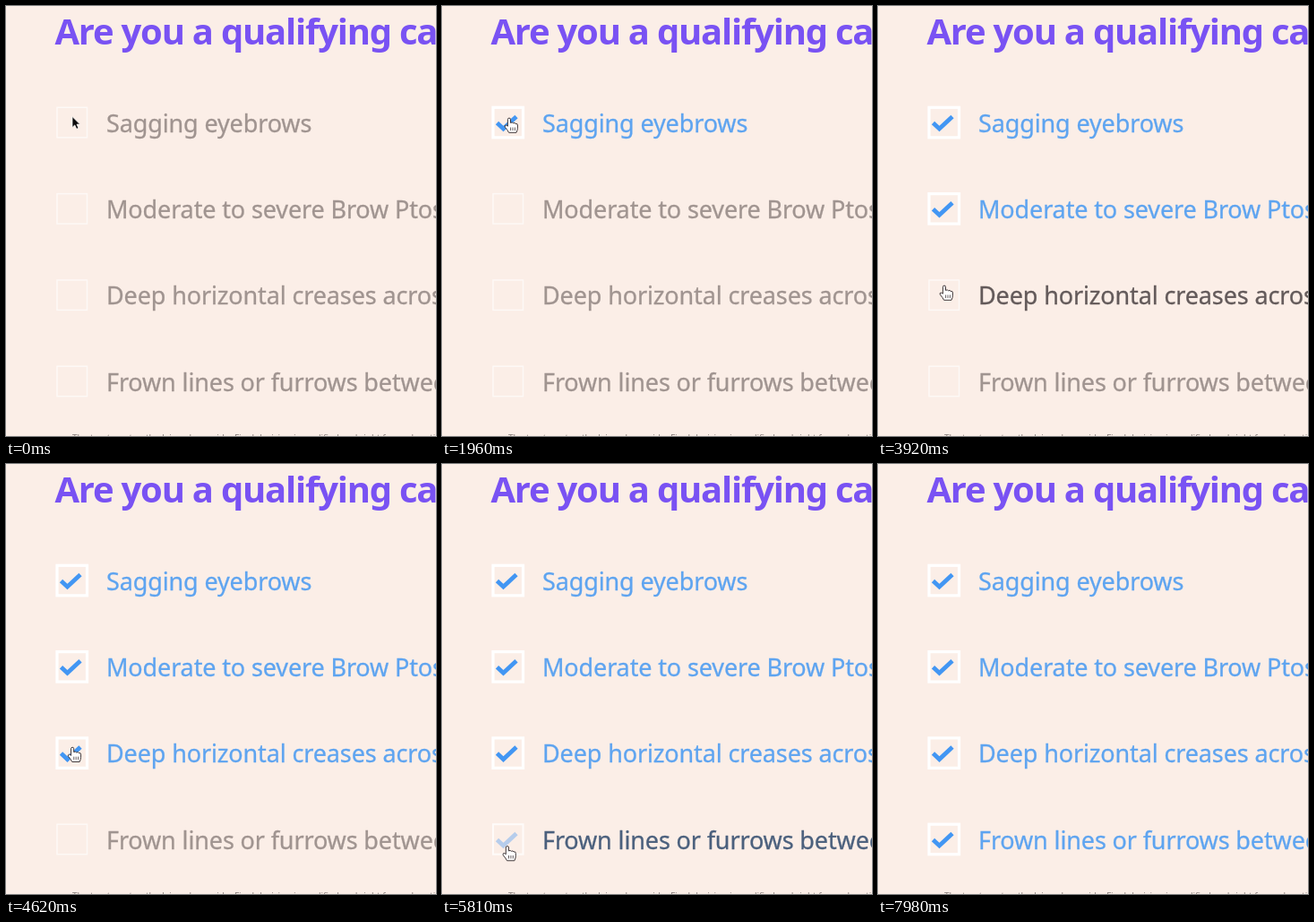
These frames come from a looping animation (480x480 px, 8 s). An HTML page:

```html
<!DOCTYPE html>
<html lang="en">
<head>
<meta charset="utf-8">
<title>Checklist</title>
<style>
  html, body { margin: 0; width: 100%; height: 100%; overflow: hidden; background: #fbeee7; }
  svg { display: block; width: 100vw; height: 100vh; }
  text { font-family: "Noto Sans", "Open Sans", sans-serif; white-space: pre; }
  .title { font-size: 40px; font-weight: 700; letter-spacing: -1.23px; fill: #7952f3; }
  .label { font-size: 27px; letter-spacing: -.13px; fill: currentColor; stroke: currentColor; stroke-width: .3; }
  .note { font-size: 10px; fill: #8f8582; }
  .box { fill: none; stroke: #fff; }
  .check { fill: none; stroke: #4296f3; stroke-width: 4.8; }
</style>
</head>
<body>
<svg viewBox="0 0 480 480">
  <rect width="480" height="480" fill="#fbeee7"/>
  <text class="title" x="54.5" y="43">Are you a qualifying candidate?</text>
  <g id="rows"></g>
  <text class="note" x="74" y="485.5">The treatment outlook is only a guide. Final decision is qualified and right for each patient</text>
  <g id="cursor">
    <path id="arrow" d="M0 0V12L2.8 9.4L4.8 13.8L6.9 12.8L5 8.6H8.6Z" fill="#0c0a0b" stroke="#fff" stroke-width=".7"/>
    <g id="hand" fill="#fff" stroke="#3f3739" stroke-width="1" stroke-linejoin="round">
      <path d="M-1.6 9.2V1.6Q-1.6 .1 0 .1T1.5 1.6V5.4Q3.6 4.2 4.4 5.8Q6.3 4.8 7.1 6.4Q9.4 5.8 9.4 8V11.2Q9.4 13.2 8 16.3H-.4Q-1.6 13.6-4.6 10.3Q-5.6 8.4-3.8 8Q-2.8 8-1.6 9.2Z"/>
      <path d="M1.6 10.5V14M4 10.5V14M6.4 10.5V14" stroke-width=".8"/>
    </g>
  </g>
</svg>
<script>
const LOOP = 8000, HOLD = 560, STEP = 70, FADE = 300, PITCH = 96.3;
const GREY = [160, 148, 144], DARK = [64, 57, 59], BLUE = [94, 164, 240];

const rows = [
  { text: "Sagging eyebrows", hover: 560, click: 1300 },
  { text: "Moderate to severe Brow Ptosis", hover: 2420, click: 2850 },
  { text: "Deep horizontal creases across", hover: 3730, click: 4300 },
  { text: "Frown lines or furrows between", hover: 4920, click: 5700 }
];

// time, x, y of the pointer tip
const path = [
  [0, 74, 123.5], [560, 74, 123.5], [900, 75, 125], [2050, 75, 125],
  [2700, 81, 225], [3200, 81, 225], [3900, 74, 312], [4550, 74, 312],
  [5150, 79, 423], [5500, 79, 423], [5900, 72, 427], [6750, 72, 427],
  [7300, 86, 500], [LOOP, 86, 500]
];

const $ = id => document.getElementById(id);
const clamp = v => Math.min(1, Math.max(0, v));
const lerp = (a, b, p) => a + (b - a) * p;
const mix = (a, b, p) => a.map((v, i) => lerp(v, b[i], p));
const ease = p => p * p * (3 - 2 * p);

function add(parent, tag, attrs) {
  const el = document.createElementNS(parent.namespaceURI, tag);
  for (const key in attrs) el.setAttribute(key, attrs[key]);
  return parent.appendChild(el);
}

rows.forEach((row, i) => {
  const g = add($("rows"), "g", { transform: `translate(0 ${i * PITCH})` });
  row.box = add(g, "rect", { class: "box", x: 57, y: 113.3, width: 33.5, height: 33.5 });
  row.check = add(g, "path", { class: "check", d: "M61.5 130.5L68.5 137L83 123.5" });
  row.label = add(g, "text", { class: "label", x: 112, y: 140.8 });
  row.label.textContent = row.text;
});

function pointerAt(t) {
  const i = Math.max(1, path.findIndex(p => p[0] > t));
  const [t0, x0, y0] = path[i - 1], [t1, x1, y1] = path[i];
  const p = ease((t - t0) / (t1 - t0));
  return [lerp(x0, x1, p), lerp(y0, y1, p)];
}

function draw(t) {
  for (const row of rows) {
    const hover = clamp((t - row.hover) / FADE);
    const done = clamp((t - row.click) / FADE);
    const color = mix(mix(GREY, DARK, hover), BLUE, done);
    row.label.style.color = `rgb(${color.map(Math.round)})`;
    row.check.style.opacity = done;
    row.box.style.strokeWidth = lerp(1.4, 3.2, done);
    row.box.style.strokeOpacity = lerp(.65, 1, done);
  }
  const [x, y] = pointerAt(t);
  const overRow = rows.some((_, i) => Math.abs(y + 5 - 130 - i * PITCH) < 24);
  const isHand = t >= HOLD && overRow;
  $("cursor").setAttribute("transform", `translate(${x} ${y})`);
  $("hand").style.display = isHand ? "" : "none";
  $("arrow").style.display = isHand ? "none" : "";
}

function frame() {
  const t = performance.now() % LOOP;
  draw(t < HOLD ? 0 : HOLD + Math.floor((t - HOLD) / STEP) * STEP);
  requestAnimationFrame(frame);
}
frame();
</script>
</body>
</html>
```
